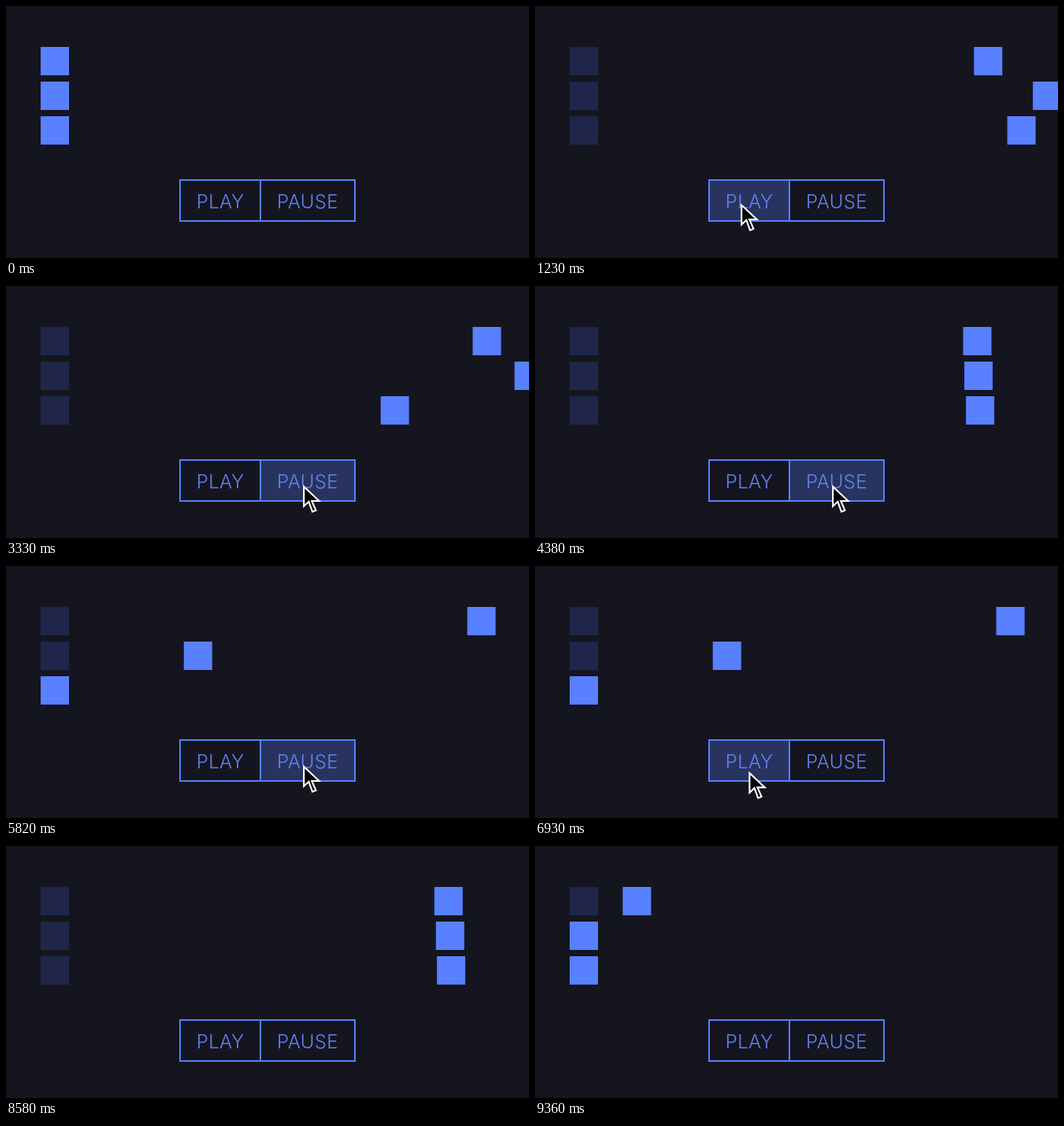
Recreate the animation shown at these times as an HTML page with a canvas. Size 664x320 px, loop 9.39 s.

```html
<!DOCTYPE html>
<html lang="en">
<head>
<meta charset="utf-8">
<title>Play and pause</title>
<style>
  html, body { margin: 0; width: 100%; height: 100%; overflow: hidden; background: #15151f; }
  canvas { display: block; }
</style>
</head>
<body>
<canvas id="stage" width="664" height="320"></canvas>
<script>
const ctx = document.getElementById('stage').getContext('2d');
const LOOP = 9390, STEP = 30;
const BACK = '#15151f', BLUE = '#5880ff', DIM = '#20264a', HOVER = '#28335f', TEXT = '#6285f2';

// Alternating tween: started by the first click, held by the second, resumed by the third
const SPEED = 1.12, START = 917, HELD_AT = 4657, RESUME = 7105;
const DURATION = 1000, STAGGER = 100, SPAN = DURATION + 2 * STAGGER;

const SIZE = 36, LEFT = 44, TOP = 52, ROW = 44, TRAVEL = 500;
const BUTTON = { x: 221, y: 221, w: 102, h: 52 };
const BUTTONS = [
  { ...BUTTON, label: 'PLAY' },
  { ...BUTTON, label: 'PAUSE', x: BUTTON.x + BUTTON.w, w: 120 }
];

// Pointer glides; sag bends a glide downwards
const ENTRY = { x: 189, y: 322 };
const GLIDES = [
  { from: 30, to: 600, x: 261, y: 250, sag: 0 },
  { from: 1860, to: 2400, x: 377, y: 252, sag: 0 },
  { from: 6030, to: 7080, x: 265, y: 254, sag: 36 },
  { from: 7980, to: 8400, x: 285, y: 324, sag: 0 }
];
const ARROW = new Path2D('M1.2 2.8V27.6L7.4 21.8 12 34.6 16.4 32.9 11.2 21H20.6Z');

const clamp01 = k => Math.min(1, Math.max(0, k));
const smooth = k => k * k * (3 - 2 * k);
const elasticOut = k => k <= 0 ? 0 : k >= 1 ? 1 : 1 - 2 ** (-10 * k) * Math.cos(4 * Math.PI * k);

function tweenTime(t) {
  const played = t < RESUME
    ? Math.min(HELD_AT, Math.max(0, t - START) * SPEED)
    : HELD_AT + (t - RESUME) * SPEED;
  return SPAN - Math.abs(SPAN - played % (2 * SPAN));
}

function pointerAt(t) {
  let { x, y } = ENTRY;
  for (const g of GLIDES) {
    const k = smooth(clamp01((t - g.from) / (g.to - g.from)));
    x += (g.x - x) * k;
    y += (g.y - y) * k + g.sag * Math.sin(Math.PI * k);
  }
  return { x, y };
}

function drawSquares(time) {
  for (let i = 0; i < 3; i++) {
    const y = TOP + i * ROW;
    const progress = elasticOut((time - i * STAGGER) / DURATION);
    ctx.fillStyle = DIM;
    ctx.fillRect(LEFT, y, SIZE, SIZE);
    ctx.fillStyle = BLUE;
    ctx.fillRect(LEFT + TRAVEL * progress, y, SIZE, SIZE);
  }
}

function drawButtons(pointer) {
  ctx.font = '300 24px Inter, sans-serif';
  ctx.letterSpacing = '0.4px';
  ctx.textAlign = 'center';
  ctx.lineWidth = 2;
  ctx.strokeStyle = BLUE;
  for (const { label, x, y, w, h } of BUTTONS) {
    const hovered = pointer.x >= x && pointer.x < x + w && pointer.y >= y && pointer.y < y + h;
    ctx.fillStyle = hovered ? HOVER : BACK;
    ctx.fillRect(x, y, w, h);
    ctx.fillStyle = TEXT;
    ctx.fillText(label, x + w / 2, y + 35.5);
  }
  for (const { x, y, w, h } of BUTTONS) ctx.strokeRect(x, y, w, h);
}

function drawPointer({ x, y }) {
  ctx.save();
  ctx.translate(x, y);
  ctx.fillStyle = '#000';
  ctx.fill(ARROW);
  ctx.strokeStyle = '#fff';
  ctx.lineWidth = 2.1;
  ctx.stroke(ARROW);
  ctx.restore();
}

function draw(now) {
  const t = Math.floor((now % LOOP) / STEP) * STEP;
  const pointer = pointerAt(t);
  ctx.fillStyle = BACK;
  ctx.fillRect(0, 0, 664, 320);
  drawSquares(tweenTime(t));
  drawButtons(pointer);
  drawPointer(pointer);
}

let start;
function tick(now) {
  start ??= now;
  draw(Math.max(0, now - start));
  requestAnimationFrame(tick);
}
draw(0);
requestAnimationFrame(tick);
</script>
</body>
</html>
```
